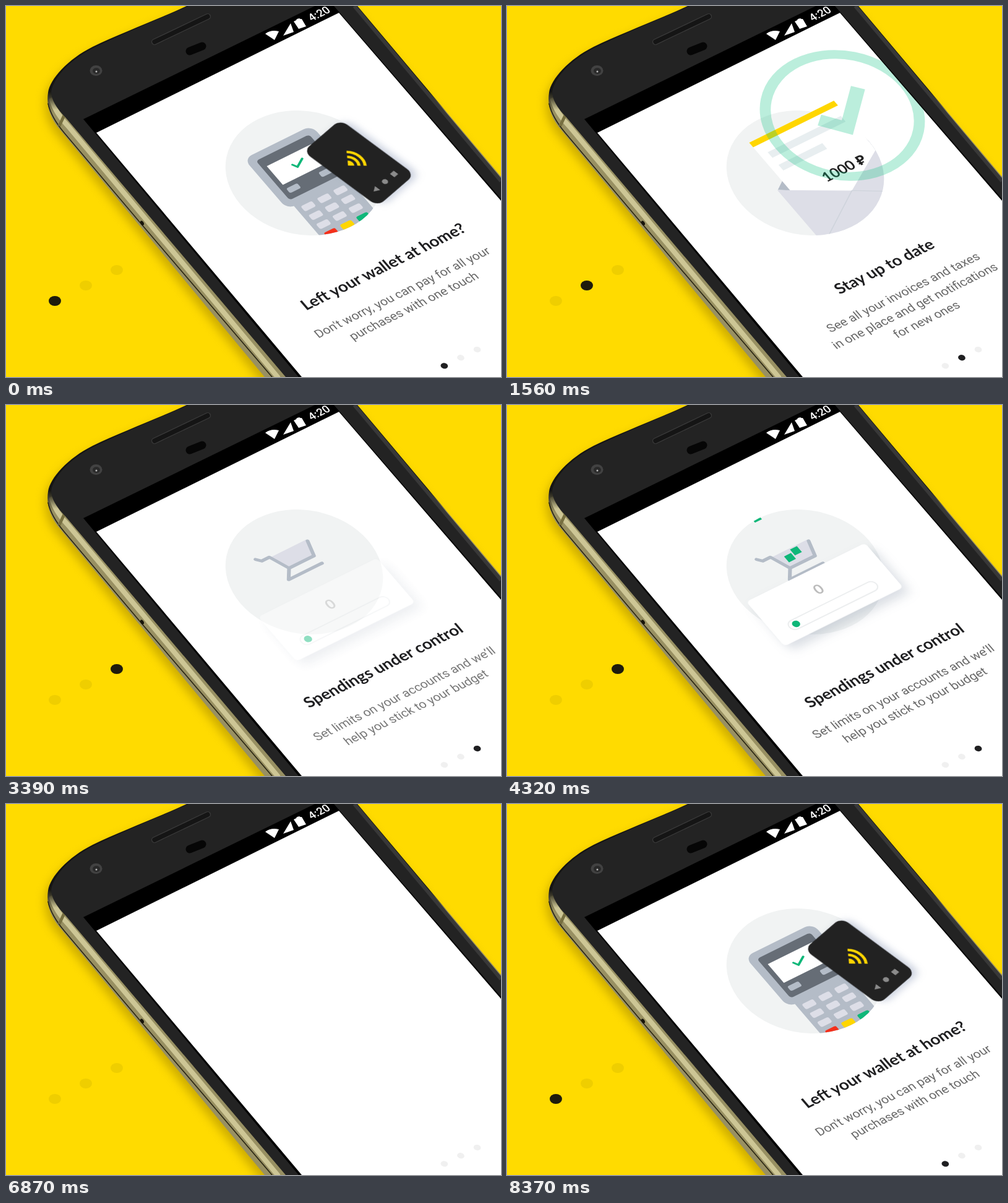
These frames come from a looping animation (800x600 px, 9 s). An HTML page:

```html
<!DOCTYPE html>
<html lang="en">
<head>
<meta charset="utf-8">
<title>Onboarding</title>
<style>
  html, body { margin: 0; width: 100%; height: 100%; overflow: hidden; background: #ffdb00; }
  svg { display: block; }
  .title { font: 700 26px Lato, "Open Sans", sans-serif; fill: #1f1f21; text-anchor: middle; }
  .sub { font: 400 20px Roboto, Inter, sans-serif; fill: #686868; text-anchor: middle; }
  .sum { font: 700 23.5px Lato, "Noto Sans", sans-serif; fill: #222; }
  .clock { font: 500 18px Roboto, sans-serif; fill: #fff; }
  .line { fill: none; stroke-linecap: round; stroke-linejoin: round; }
  .card { filter: drop-shadow(4px 12px 9px rgba(70, 90, 120, .2)); }
  .handset { filter: drop-shadow(6px 5px 6px rgba(70, 90, 140, .28)); }
</style>
</head>
<body>
<svg width="800" height="600" viewBox="0 0 800 600">
  <defs>
    <clipPath id="screen"><path d="M146,205 538,11 800,315V600H478Z"/></clipPath>
    <clipPath id="disc"><circle r="115"/></clipPath>
    <clipPath id="slot"><path d="M-115,0V-300H115V0A115,115 0 0 1 -115,0Z"/></clipPath>
    <linearGradient id="rim" gradientUnits="userSpaceOnUse" x1="0" y1="138" x2="0" y2="172">
      <stop offset="0" stop-color="#151513"/><stop offset="1" stop-color="#989062"/>
    </linearGradient>
    <linearGradient id="shine" gradientUnits="userSpaceOnUse" x1="0" y1="148" x2="0" y2="168">
      <stop offset="0" stop-color="#4a462f"/><stop offset="1" stop-color="#cdc695"/>
    </linearGradient>
    <filter id="blur" x="-20%" y="-20%" width="140%" height="140%"><feGaussianBlur stdDeviation="8"/></filter>
    <path id="body" d="M292,0C250,20 185,44 140,66C100,86 71,118 68,140C65,160 70,180 88,201L214,353 418,600H800V276L568,0Z"/>
  </defs>

  <rect width="800" height="600" fill="#ffdb00"/>
  <use href="#body" transform="translate(-4 9)" fill="#a88a00" opacity=".6" filter="url(#blur)"/>
  <use href="#body" fill="url(#rim)"/>
  <g class="line">
    <path d="M74,152Q80,173 101,195L439,600" stroke="url(#shine)" stroke-width="8"/>
    <path d="M68,158Q73,180 94,205L219,353 430,600" stroke="#292512" stroke-width="1.6"/>
    <path d="M94,177 86,194" stroke="#776f40" stroke-width="5" stroke-linecap="butt"/>
  </g>
  <ellipse cx="220" cy="351" rx="2.5" ry="4" transform="rotate(-30 220 351)" fill="#17140a"/>
  <path d="M295,0C250,20 190,44 145,66C104,86 78,114 73,138Q73,157 96,180L452,600H800V280L566,0Z" fill="#232323"/>
  <path d="M563,0 800,283" stroke="#383838" stroke-width="6"/>
  <path d="M125,183 499,0H530L802,314V600H473Z" fill="#000"/>
  <path d="M146,205 538,11 800,315V600H478Z" fill="#fff"/>

  <g class="line">
    <path d="M240,58 326,17" stroke="#3a3a3a" stroke-width="10"/>
    <path d="M240,58 326,17" stroke="#151515" stroke-width="7.5"/>
    <path d="M297,73 317,65" stroke="#060606" stroke-width="13"/>
  </g>
  <ellipse cx="145.500" cy="104.500" rx="10" ry="8.500" fill="#424242"/>
  <ellipse cx="146" cy="105" rx="6" ry="5" fill="#2a2a2a"/>
  <circle cx="146" cy="106" r="1.500" fill="#bbb"/>
  <g fill="#fff">
    <path d="M419,45Q428,38 441,41L434,55Z"/>
    <path d="M448,48 460,28 465,42Z"/>
    <path d="M465,25 469,23 470,21 474,20 476,21 478,21 485,33 473,37Z"/>
    <text class="clock" transform="matrix(.896 -.444 .65 .757 494 25)">4:20</text>
  </g>
  <g id="bigDots"></g>

  <g clip-path="url(#screen)"><g transform="matrix(.896 -.444 .65 .757 482 270)">
    <g id="smallDots"></g>
    <circle id="circle" r="115" fill="#f1f3f3"/>

    <g clip-path="url(#disc)">
      <g id="terminal">
        <rect x="-49" y="30" width="98" height="100" fill="#b4bcc7"/>
        <rect x="-61" y="-66" width="122" height="108" rx="14" fill="#b4bcc7"/>
        <rect x="-48" y="-54" width="96" height="84" rx="5" fill="#666d76"/>
        <rect x="-40" y="-38" width="80" height="40" fill="#fff"/>
        <rect x="-40" y="10" width="20" height="10" rx="3" fill="#b4bcc7"/>
        <rect x="18" y="10" width="20" height="10" rx="3" fill="#b4bcc7"/>
        <g id="keys"></g>
        <path id="tick" class="line" d="M-6,-21 -2,-14 13,-23" stroke="#0fb779" stroke-width="3.500" stroke-linecap="butt"/>
      </g>
    </g>
    <g id="handset"><g class="handset" transform="translate(80 25.600) rotate(-14)">
      <rect x="-42" y="-71" width="84" height="142" rx="14" fill="#222"/>
      <path id="wave0" d="M-15,-8 -8.500,-14.500A9,9 0 0 1 -8.500,-1.500Z" fill="#ffd600"/>
      <g fill="none" stroke="#ffd600" stroke-width="4.600">
        <path id="wave1" d="M-3.700,-19.300A16,16 0 0 1 -3.700,3.300"/>
        <path id="wave2" d="M2.700,-25.700A25,25 0 0 1 2.700,9.700"/>
      </g>
      <g fill="#8b8b8b">
        <path d="M-25,49 -16,44V54Z"/><circle cx="1" cy="49" r="4.500"/><rect x="17" y="45" width="8.500" height="8.500"/>
      </g>
    </g></g>

    <g clip-path="url(#disc)"><path id="flap" d="M-53,5 38,-55Q42,-58 46,-55L136,5 42,70Z" fill="#b4bcc7"/></g>
    <g clip-path="url(#slot)"><g id="letter">
      <rect x="-38" y="-87" width="158" height="200" fill="#fff"/>
      <rect x="-38" y="-87" width="158" height="10" fill="#ffd600"/>
      <rect x="-25" y="-59" width="132" height="12" fill="#e8eef0"/>
      <rect x="-25" y="-32" width="79" height="12" fill="#e8eef0"/>
      <text id="amount" class="sum" x="17" y="30">1000 ₽</text>
    </g></g>
    <g clip-path="url(#disc)"><g id="front">
      <path d="M-54,5 40,61 136,5V130H-54Z" fill="#dddee7"/>
      <path d="M40,61 -54,121M40,61 136,121" stroke="#cfd4dc" stroke-width="1.500"/>
    </g></g>
    <g transform="translate(109.500 -58.700)"><g id="stamp" class="line" stroke="#0cc381">
      <circle r="22.500" stroke-width="3.200"/>
      <path d="M-6.800,-2 -1.400,4.400 10,-6" stroke-width="4.200" stroke-linecap="butt" stroke-linejoin="miter"/>
    </g></g>

    <g clip-path="url(#disc)"><g id="cart">
      <path d="M-27,-47H38L30,-18H-15Z" fill="#dddee7"/>
      <path class="line" d="M-48,-55 -42,-48H-28L-15,-17H30L38,-44M-15,-17 -28,0H32" stroke="#b4bcc7" stroke-width="5.500"/>
      <g fill="#0fb779">
        <rect id="box0" x="-10" y="-39" width="12.500" height="12.500"/>
        <rect id="box1" x="5" y="-39" width="12.500" height="12.500"/>
        <rect id="box2" x="-10" y="-53.500" width="12.500" height="12.500"/>
        <rect id="box3" x="5" y="-53.500" width="12.500" height="12.500"/>
      </g>
    </g></g>
    <g id="card">
      <rect class="card" x="-107" y="1" width="214" height="95" rx="6" fill="#fff"/>
      <text id="count" class="sum" x="-2" y="44" text-anchor="middle"></text>
      <rect x="-80" y="62" width="157" height="18" rx="9" fill="#fff" stroke="#eceeef" stroke-width="2"/>
      <rect id="bar" x="-74" y="65" height="12" rx="6" fill="#0fb779"/>
    </g>
    <g id="texts"></g>
  </g></g>
</svg>

<script>
const LOOP = 9000, STEP = 30;
const $ = id => document.getElementById(id);
const clamp = v => Math.max(0, Math.min(1, v));
const easeIn = p => p * p;
const easeOut = p => 1 - (1 - p) ** 3;
const span = (t, [a, b]) => clamp((t - a) / (b - a));

const pages = [
  ['Left your wallet at home?', "Don't worry, you can pay for all your", 'purchases with one touch'],
  ['Stay up to date', 'See all your invoices and taxes', 'in one place and get notifications', 'for new ones'],
  ['Spendings under control', 'Set limits on your accounts and we’ll', 'help you stick to your budget']
];
$('texts').innerHTML = pages.map(([title, ...lines], i) =>
  `<text id="title${i}" class="title" x="-2" y="208">${title}</text><g id="sub${i}">` +
  lines.map((s, n) => `<text class="sub" x="-6" y="${258.5 + n * 29}">${s}</text>`).join('') + '</g>').join('');

const keyRow = ['#f4301b', '#ffd600', '#0fb779'];
$('keys').innerHTML = [...Array(12)].map((_, i) => {
  const row = Math.floor(i / 3), col = i % 3;
  return `<rect x="${-41 + col * 29}" y="${47.5 + row * 19}" width="20" height="11" rx="3" fill="${row < 3 ? '#dddee7' : keyRow[col]}"/>`;
}).join('');

for (let i = 0; i < 3; i++) {
  const big = `cx="${79 + i * 50}" cy="${477 - i * 25}" rx="10" ry="8"`;
  const small = `cx="${-32.5 + i * 29.7}" cy="393" r="5.3"`;
  $('bigDots').innerHTML += `<ellipse ${big} fill="#efce00"/><ellipse id="big${i}" ${big} fill="#1e1b0c"/>`;
  $('smallDots').innerHTML += `<circle ${small} fill="#f0f0f0"/><circle id="small${i}" ${small} fill="#1f1f21"/>`;
}

// id, hidden pose, entry times, exit times, entry easing
const fade = { o: 0 }, rise = { y: 50, o: 0 }, drop = { y: -90 }, dropTop = { y: -77 };
const tracks = [
  ['circle', { s: 0 }, [6900, 7260], [5880, 6210]],
  ['terminal', { y: 215 }, [7140, 7560], [150, 540]],
  ['handset', { x: 50, y: 60, o: 0 }, [7440, 7950], [60, 450]],
  ['wave0', fade, [7920, 8070], [150, 240]],
  ['wave1', fade, [8010, 8160], [90, 210]],
  ['wave2', fade, [8100, 8250], [30, 180]],
  ['tick', fade, [8190, 8370], [30, 180]],
  ['flap', { y: 190 }, [780, 1140], [2520, 2850]],
  ['front', { y: 190 }, [780, 1140], [2520, 2850]],
  ['letter', { y: 215 }, [1020, 1440], [2200, 2560]],
  ['amount', fade, [1290, 1500], [2250, 2400]],
  ['stamp', { s: 6.56, o: 0 }, [1380, 1720], [2160, 2340], easeIn],
  ['cart', { x: -190 }, [2970, 3420], [5640, 6000]],
  ['box0', drop, [3830, 4130], [8000, 8001], easeIn],
  ['box1', drop, [4030, 4330], [8000, 8001], easeIn],
  ['box2', dropTop, [4230, 4530], [8000, 8001], easeIn],
  ['box3', dropTop, [4430, 4730], [8000, 8001], easeIn],
  ['card', { y: 60, o: 0 }, [3300, 3780], [5340, 5730]],
  ['title0', fade, [7200, 7500], [430, 730]],
  ['title1', fade, [780, 1080], [2560, 2860]],
  ['title2', fade, [2970, 3270], [5710, 6010]],
  ['sub0', rise, [7350, 7770], [30, 430]],
  ['sub1', rise, [960, 1410], [2160, 2560]],
  ['sub2', rise, [3150, 3600], [5310, 5710]]
];
[[[7020, 7320], [330, 600]], [[540, 720], [2460, 2730]], [[2670, 2850], [6180, 6390]]].forEach(([on, off], i) => {
  tracks.push([`big${i}`, fade, on, off, easeIn], [`small${i}`, fade, on, off, easeIn]);
});

function presence(t, on, off, ease) {
  const enter = ease(span(t, on)), stay = 1 - easeIn(span(t, off));
  const wraps = on[0] > off[0];
  return wraps ? (t < on[0] ? stay : enter) : (t < off[0] ? enter : stay);
}

function draw(t) {
  for (const [id, { x = 0, y = 0, s = 1, o = 1 }, on, off, ease = easeOut] of tracks) {
    const away = 1 - presence(t, on, off, ease), el = $(id);
    el.setAttribute('transform', `translate(${x * away} ${y * away}) scale(${1 + (s - 1) * away})`);
    el.setAttribute('opacity', 1 + (o - 1) * away);
  }
  const p = easeOut(span(t, [4320, 5100]));
  const sum = Math.round(p * 500) * 10;
  $('count').textContent = sum ? `${sum} ₽` : '0';
  $('count').style.fill = sum ? '#222' : '#bcbcbc';
  $('bar').setAttribute('width', 12 + 98 * p);
}

const start = performance.now();
function tick() {
  const t = (performance.now() - start) % LOOP;
  draw(Math.floor(t / STEP) * STEP);
  requestAnimationFrame(tick);
}
tick();
</script>
</body>
</html>
```
